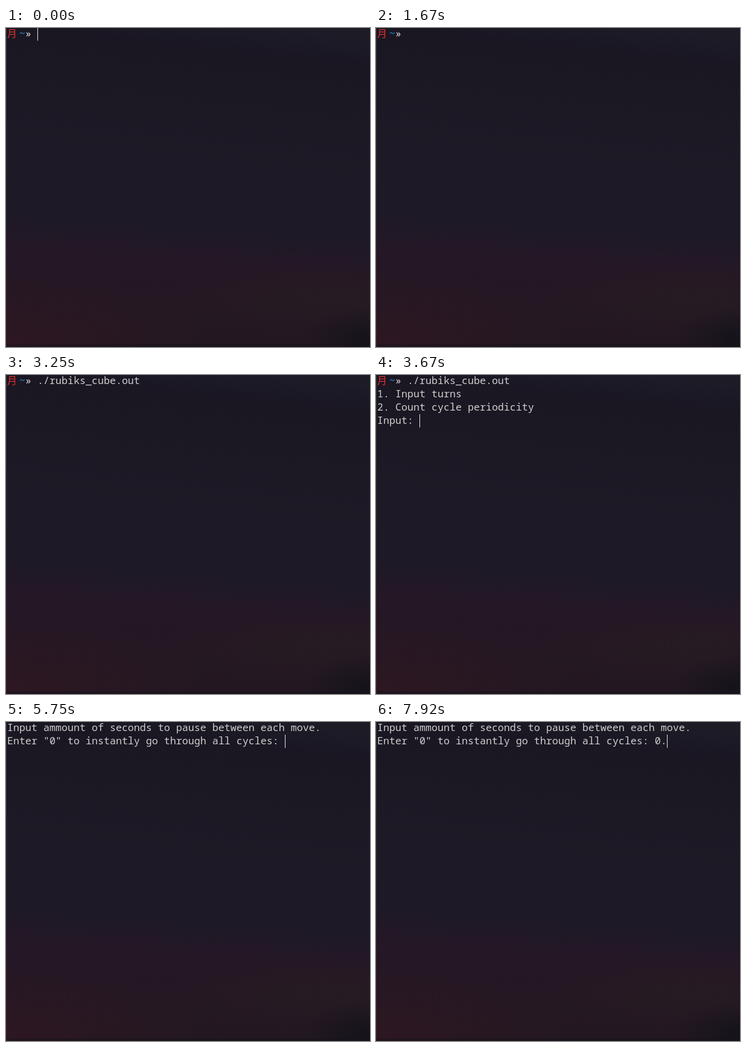
An HTML page with a canvas that plays this animation: 603x529 px, repeating every 8 s.

```html
<!DOCTYPE html>
<html lang="en">
<head>
<meta charset="utf-8">
<title>Terminal session</title>
<style>
  html, body { margin: 0; width: 100%; height: 100%; overflow: hidden; background: #1b1823; }
  canvas {
    display: block;
    background:
      linear-gradient(#33323c, #30202c 65%, #4a1830) 0 0 / 1px 100% no-repeat,
      linear-gradient(transparent 523px, #15111a88 526px),
      radial-gradient(ellipse 110px 55px at 603px 518px, #14131a, #14131a00),
      radial-gradient(ellipse 270px 60px at 530px 448px, #261b22, #261b2200),
      radial-gradient(ellipse 330px 130px at 0 529px, #2c1722 10%, #2c172200),
      linear-gradient(184deg, #1b1b2600 350px, #251726 410px, #231822 529px),
      linear-gradient(186deg, #1c1b26 20px, #1a1723 60px, #1b1823 130px, #1d1925 230px, #1e1926 380px);
  }
</style>
</head>
<body>
<canvas id="stage" width="603" height="529"></canvas>
<script>
const ctx = document.getElementById('stage').getContext('2d');
const LOOP = 8000, CELL = 10, LINE = 22, LEFT = 2;
const MONO = '16.667px "Noto Sans Mono", monospace';
const KANJI = '16px "Noto Sans CJK JP", "Noto Sans CJK", sans-serif';
const PROMPT = '     ';
const COMMAND = PROMPT + './rubiks_cube.out';
const menu = [COMMAND, '1. Input turns', '2. Count cycle periodicity', 'Input: '];
const question = [
  'Input ammount of seconds to pause between each move.',
  'Enter "0" to instantly go through all cycles: '
];

const typed = (lines, extra) => [...lines.slice(0, -1), lines.at(-1) + extra];

// Each step: start time, screen lines, cursor visible
const steps = [
  [0, [PROMPT], true],
  [420, [PROMPT], false],
  [1080, [PROMPT], true],
  [1670, [PROMPT], false],
  [2250, [PROMPT], true],
  [2330, [PROMPT + '.'], true],
  [2420, [PROMPT + './'], true],
  [2500, [PROMPT + './r'], true],
  [2580, [PROMPT + './ru'], true],
  [2670, [COMMAND + ' '], true],
  [3250, [COMMAND + ' '], false],
  [3670, menu, true],
  [4250, menu, false],
  [4830, menu, true],
  [5330, typed(menu, '2'), true],
  [5750, question, true],
  [6330, question, false],
  [6920, question, true],
  [7580, typed(question, '0'), true],
  [7920, typed(question, '0.'), true]
];

function text(string, column, row, color, font = MONO) {
  ctx.font = font;
  ctx.fillStyle = color;
  ctx.fillText(string, LEFT + column * CELL, 15 + row * LINE);
}

function draw(now) {
  const time = now % LOOP;
  const [, lines, cursor] = steps.findLast(([start]) => start <= time);
  ctx.clearRect(0, 0, 603, 529);
  if (lines[0].startsWith(PROMPT)) {
    text('月', 0, 0, '#e5322f', KANJI);
    text('~', 2, 0, '#2f8fd0');
    text('»', 3, 0, '#e2e0e0');
  }
  lines.forEach((line, row) => text(line, 0, row, '#d0cecd'));
  if (cursor) {
    const row = lines.length - 1;
    ctx.fillStyle = '#e6e4e4';
    ctx.fillRect(LEFT + lines[row].length * CELL, row * LINE - 1, 1, LINE);
  }
  requestAnimationFrame(() => draw(performance.now() - begin));
}

const begin = performance.now();
draw(0);
</script>
</body>
</html>
```
